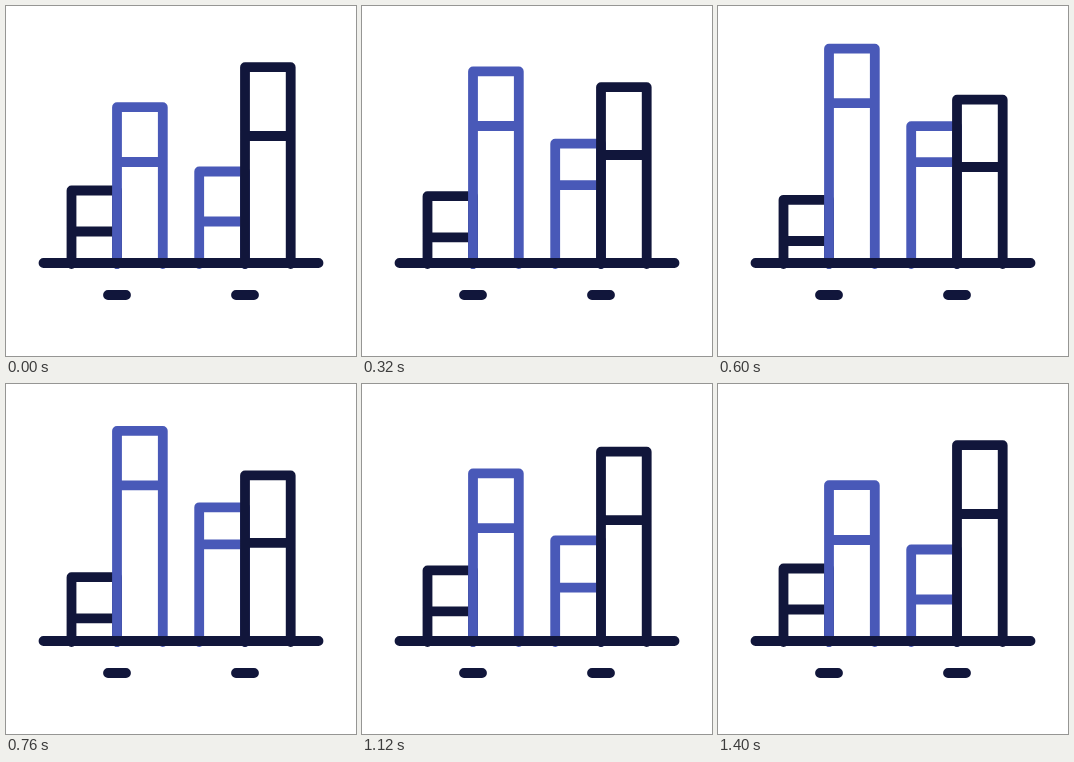
An HTML page that plays this animation: 350x350 px, repeating every 1.64 s.

```html
<!DOCTYPE html>
<html lang="en">
<head>
<meta charset="utf-8">
<title>Bar chart</title>
<style>
  html, body { margin: 0; width: 100%; height: 100%; overflow: hidden; background: #fff; }
  svg { display: block; width: 100%; height: 100%; }
  path { fill: none; stroke-width: 9.8; stroke-linecap: round; stroke-linejoin: round; }
  .dark { stroke: #11163b; }
  .blue { stroke: #4959b8; }
</style>
</head>
<body>
<svg viewBox="0 0 350 350">
  <g id="bars"></g>
  <path class="dark" d="M37.5 257H312.5M102 289H120M230 289H248"/>
</svg>
<script>
const LOOP = 1640, STEP = 40, PEAK = 600, END = 1400, FLOOR = 258;

// top and mid: [resting y, travel at the peak]
const bars = [
  { color: 'dark', left: 65.5, right: 111, top: [184.5, 9.3], mid: [225.5, 9.5] },
  { color: 'blue', left: 111, right: 156.8, top: [101.2, -58.5], mid: [156, -58.8] },
  { color: 'blue', left: 193.2, right: 239, top: [165.5, -45.4], mid: [215.5, -59.4] },
  { color: 'dark', left: 239, right: 284.7, top: [61.2, 32.5], mid: [130, 31] }
];

const group = document.getElementById('bars');
for (const bar of bars) {
  bar.path = document.createElementNS('http://www.w3.org/2000/svg', 'path');
  bar.path.setAttribute('class', bar.color);
  group.append(bar.path);
}

// cubic easing with handles (a, 0) and (b, 1)
function ease(a, b, x) {
  let lo = 0, hi = 1;
  for (let i = 0; i < 24; i++) {
    const s = (lo + hi) / 2, r = 1 - s;
    if (3 * a * s * r * r + 3 * b * s * s * r + s ** 3 < x) lo = s;
    else hi = s;
  }
  return lo * lo * (3 - 2 * lo);
}

function swing(t) {
  if (t <= 0 || t >= END) return 0;
  return t < PEAK
    ? ease(0.18, 0.68, t / PEAK)
    : 1 - ease(0.48, 0.465, (t - PEAK) / (END - PEAK));
}

function draw(t) {
  const p = swing(t);
  const at = ([rest, travel]) => (rest + travel * p).toFixed(2);
  for (const { path, left, right, top, mid } of bars) {
    path.setAttribute('d',
      `M${left} ${FLOOR}V${at(top)}H${right}V${FLOOR}M${left} ${at(mid)}H${right}`);
  }
}

const start = performance.now();
function tick() {
  const t = (performance.now() - start) % LOOP;
  draw(Math.floor(t / STEP) * STEP);
  requestAnimationFrame(tick);
}
draw(0);
requestAnimationFrame(tick);
</script>
</body>
</html>
```
